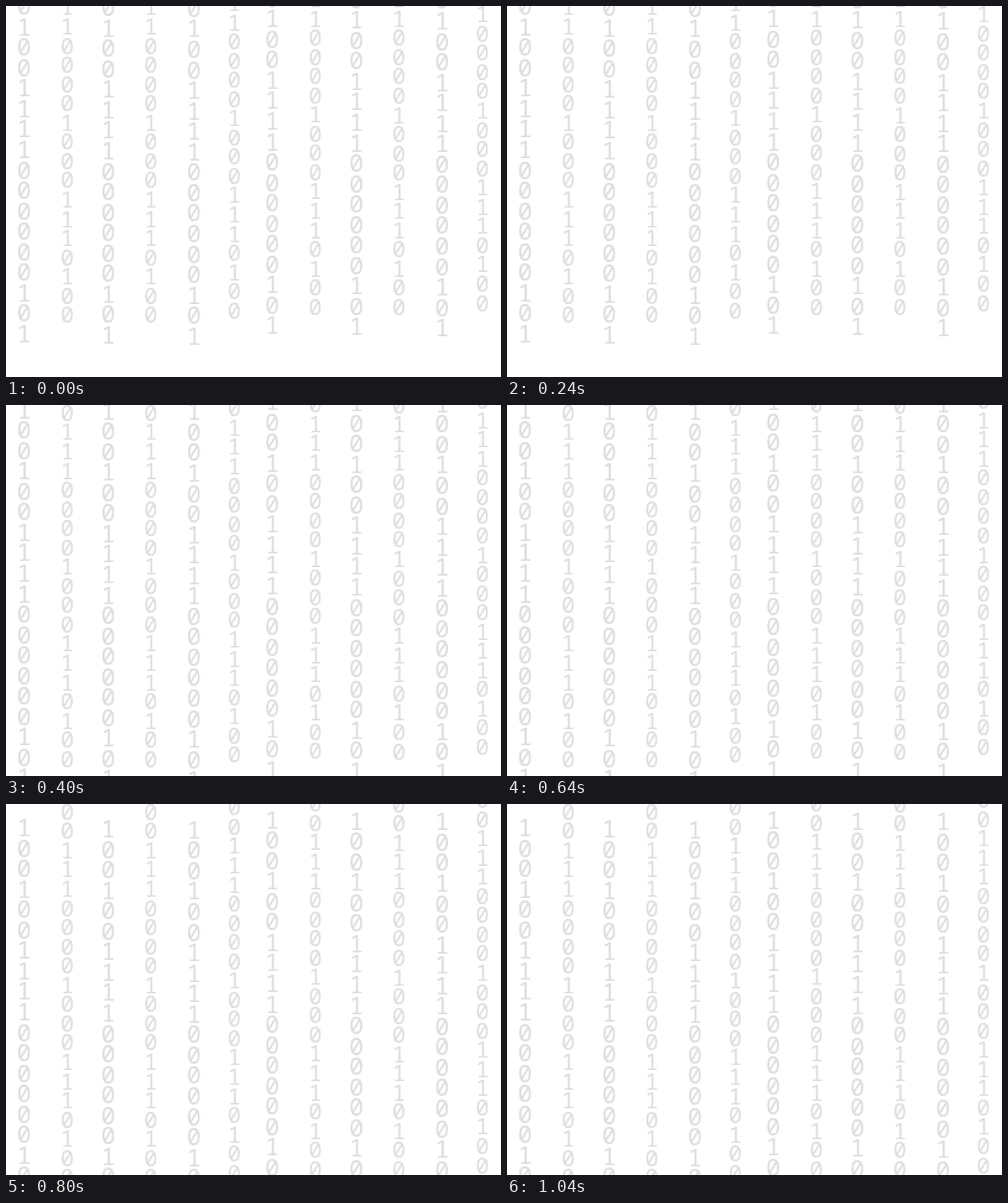
These frames come from a looping animation (800 px wide and 600 px high, 1200 ms). An HTML page with a canvas:

```html
<!DOCTYPE html>
<html lang="en">
<head>
<meta charset="utf-8">
<title>Falling binary digits</title>
<style>
  html, body { margin: 0; width: 100%; height: 100%; overflow: hidden; background: #fff; }
  canvas { display: block; width: 800px; height: 600px; image-rendering: pixelated; }
</style>
</head>
<body>
<canvas width="400" height="300"></canvas>
<script>
const ctx = document.querySelector('canvas').getContext('2d');

// bottoms: [x, y] centre of the lowest digit in each column at time zero
const strands = [
  {
    digits: '1001001111000000101', pitch: 33.1, size: 39,
    bottoms: [[29, 530], [165, 532], [303.5, 533.5], [430, 517], [566, 519], [704.5, 520.5]]
  },
  {
    digits: '00111000010001110100', pitch: 31.1, size: 36.5,
    bottoms: [[99, 499.5], [234, 499.5], [369, 492.5], [500, 486.5], [635, 487], [770, 480]]
  }
];
const drops = [0, 73, 104];
const stepTime = 400;
const capHeight = 0.714;
let shown = -1;

function drawColumn({ digits, pitch, size }, x, bottom) {
  const last = digits.length - 1;
  [...digits].forEach((digit, i) => {
    const y = bottom - (last - i) * pitch;
    ctx.fillText(digit, x, y + size * capHeight / 2);
  });
}

function draw(drop) {
  ctx.setTransform(1, 0, 0, 1, 0, 0);
  ctx.fillStyle = '#fff';
  ctx.fillRect(0, 0, 400, 300);
  ctx.scale(0.5, 0.5);
  ctx.fillStyle = '#dcdcdc';
  ctx.textAlign = 'center';
  for (const strand of strands) {
    ctx.font = `${strand.size}px "Noto Sans Mono", "DejaVu Sans Mono", monospace`;
    for (const [x, y] of strand.bottoms) drawColumn(strand, x, y + drop);
  }
}

function tick() {
  const step = Math.floor(performance.now() / stepTime) % drops.length;
  if (step !== shown) draw(drops[shown = step]);
  requestAnimationFrame(tick);
}
tick();
</script>
</body>
</html>
```
